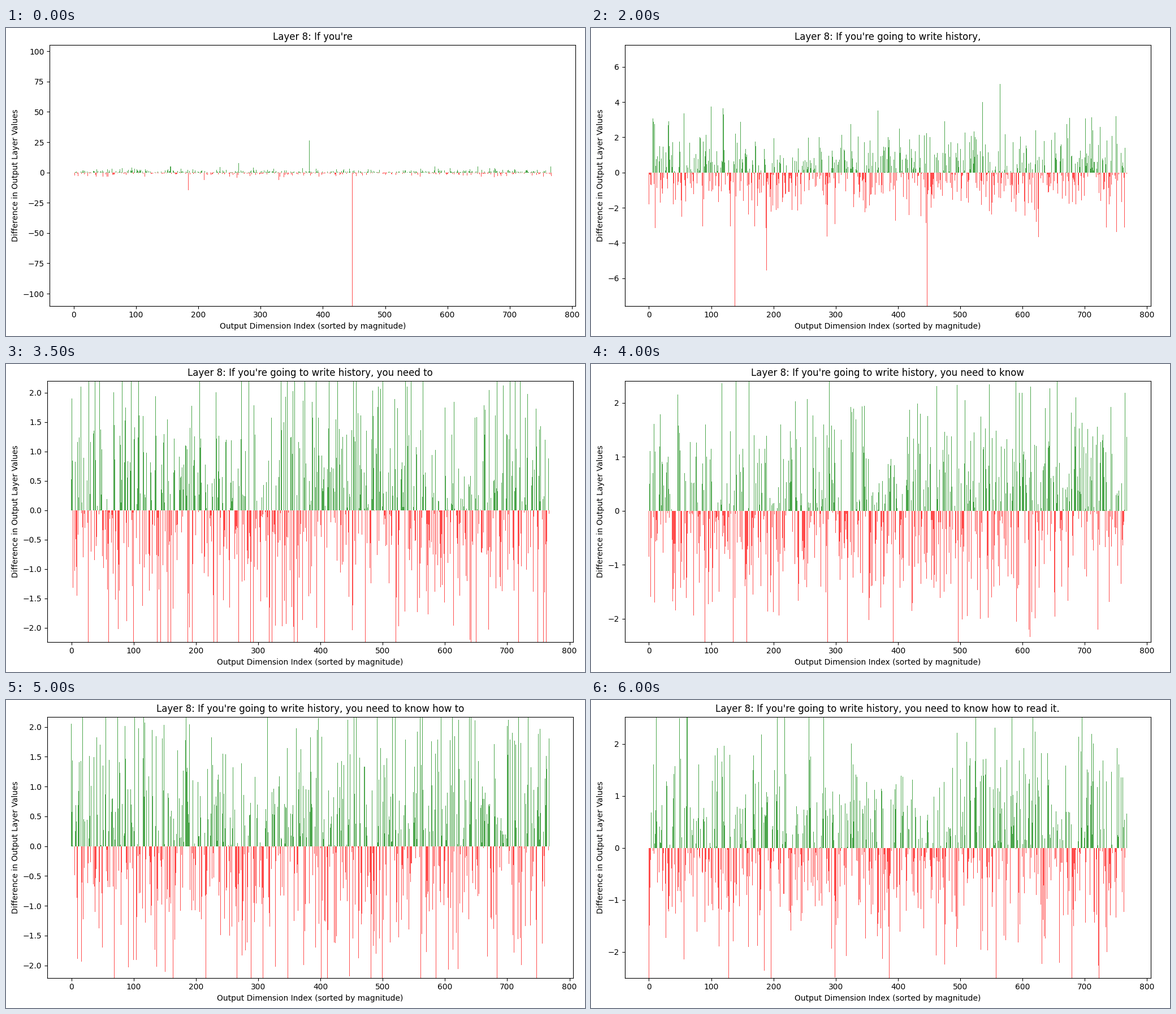
Recreate the animation shown at these times as a matplotlib script. Size 1024x545 px, loop 6500 ms.

```python
import numpy as np
import matplotlib.pyplot as plt
from matplotlib.animation import FuncAnimation

W, H, DPI = 1024, 545, 100
AX_W, AX_H, PAD = 930, 462, 10
N = 768
DECAY = 0.45
SPIKES = [138, 447]
WORDS = "If you're going to write history, you need to know how to read it.".split()
STEPS = len(WORDS) - 1

# key points of the vertical range, blended geometrically in between
KEYS = [0, 2, 4, 5, 6, 7, 8, 10, 12]
LOW = [110.1, 27.44, 7.57, 4.54, 3.12, 2.24, 2.43, 2.21, 2.5]
HIGH = [105.4, 26.28, 7.25, 4.39, 3.04, 2.2, 2.41, 2.17, 2.52]


def blend(k, points):
    return np.exp(np.interp(k, KEYS, np.log(points)))


def values(k):
    """Heavy-tailed noise that calms down, plus three fading outliers."""
    v = np.random.default_rng(80 + k).standard_t(3 + k, N)
    v[SPIKES] -= 400 * DECAY ** k
    v[378] += 25.5 * DECAY ** k
    return v


fig = plt.figure(figsize=(W / DPI, H / DPI), dpi=DPI, facecolor="white")
ax = fig.add_axes([60 / W, 53 / H, AX_W / W, AX_H / H])
bars = ax.bar(np.arange(N), np.ones(N), alpha=0.7)
margin = 0.05 * (N - 0.2)
ax.set_xlim(-0.4 - margin, N - 0.6 + margin)
ax.set_xlabel("Output Dimension Index (sorted by magnitude)")
ax.set_ylabel("Difference in Output Layer Values")


def fit():
    """Move the axes so that both axis labels sit PAD pixels from the edge."""
    renderer = fig.canvas.get_renderer()
    dx = PAD - ax.yaxis.get_tightbbox(renderer).x0
    dy = PAD - ax.xaxis.get_tightbbox(renderer).y0
    box = ax.get_position()
    ax.set_position([box.x0 + dx / W, box.y0 + dy / H, AX_W / W, AX_H / H])


def draw(k):
    ax.set_ylim(-blend(k, LOW), blend(k, HIGH))
    ax.set_title("Layer 8: " + " ".join(WORDS[:k + 2]))
    for bar, v in zip(bars, values(k)):
        bar.set_height(v)
        bar.set_facecolor("green" if v > 0 else "red")
    if 1 <= k <= 3:
        for i in SPIKES:
            bars[i].set_facecolor("0.15")
    fit()
    return []


anim = FuncAnimation(fig, draw, frames=STEPS, init_func=lambda: draw(0),
                     interval=500, repeat=True, repeat_delay=0, blit=False)
plt.show()
```
